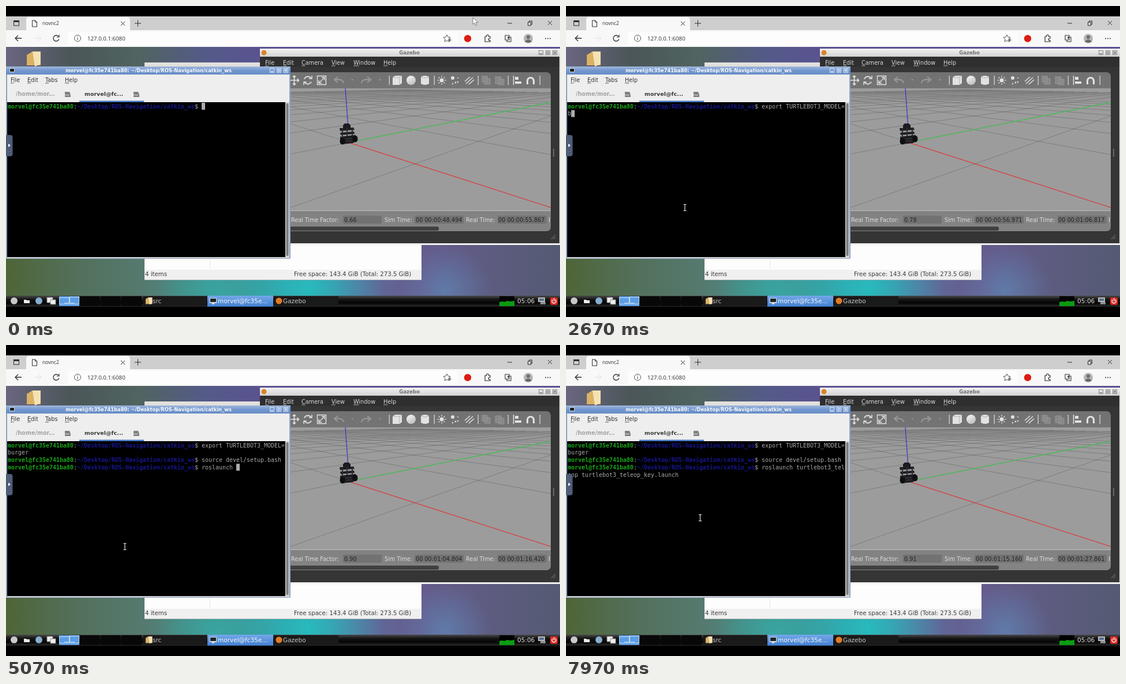
Animation, 960 px wide and 540 px high, one loop 8000 ms. Source, as an HTML page with a canvas:

```html
<!DOCTYPE html>
<html lang="en">
<head>
<meta charset="utf-8">
<title>Robot teleop session</title>
<style>
  html, body { margin: 0; width: 100%; height: 100%; overflow: hidden; background: #000; }
  canvas { position: absolute; left: 0; top: 0; }
</style>
</head>
<body>
<canvas id="desk" width="960" height="540"></canvas>
<canvas id="live" width="960" height="540"></canvas>
<script>
const LOOP = 8000;
const USER = 'morvel', HOST = 'fc35e741ba80';
const PATH = '~/Desktop/ROS-Navigation/catkin_ws';
const SANS = '"DejaVu Sans", sans-serif', MONO = '"DejaVu Sans Mono", monospace', WEB = '"Open Sans", sans-serif';
const desk = document.getElementById('desk').getContext('2d');
const live = document.getElementById('live').getContext('2d');
let c = desk;

// Drawing helpers
function rect(x, y, w, h, fill) { c.fillStyle = fill; c.fillRect(x, y, w, h); }
function box(x, y, w, h, stroke, width = 1) { c.strokeStyle = stroke; c.lineWidth = width; c.strokeRect(x, y, w, h); }
function round(x, y, w, h, r, fill) { c.fillStyle = fill; c.beginPath(); c.roundRect(x, y, w, h, r); c.fill(); }
function disc(x, y, r, fill) { c.fillStyle = fill; c.beginPath(); c.arc(x, y, r, 0, 7); c.fill(); }
function oval(x, y, rx, ry, fill) { c.fillStyle = fill; c.beginPath(); c.ellipse(x, y, rx, ry, 0, 0, 7); c.fill(); }
function arc(x, y, r, from, to, stroke, width = 1) {
  c.strokeStyle = stroke; c.lineWidth = width; c.beginPath(); c.arc(x, y, r, from, to); c.stroke();
}
function path(d, stroke, width = 1, fill) {
  const p = new Path2D(d);
  if (fill) { c.fillStyle = fill; c.fill(p); }
  if (stroke) { c.strokeStyle = stroke; c.lineWidth = width; c.stroke(p); }
}
function text(s, x, y, fill, font, align = 'left') {
  c.fillStyle = fill; c.font = font; c.textAlign = align; c.textBaseline = 'alphabetic';
  c.fillText(s, x, y);
}
function gradient(x0, y0, x1, y1, ...colors) {
  const g = c.createLinearGradient(x0, y0, x1, y1);
  colors.forEach((color, i) => g.addColorStop(i / (colors.length - 1), color));
  return g;
}
function glow(x, y, r, color) {
  const g = c.createRadialGradient(x, y, 0, x, y, r);
  g.addColorStop(0, color + 'd0'); g.addColorStop(1, color + '00');
  rect(0, 71, 960, 432, g);
}
function menu(items, y, fill) {
  for (const [label, x] of items) {
    text(label, x, y, fill, '9.7px ' + SANS);
    rect(x, y + 1.5, c.measureText(label[0]).width, 0.8, fill);
  }
}
function windowButtons(xs, y, color) {
  for (const x of xs) box(x - 3.5, y - 3.5, 7, 7, color, 0.8);
  rect(xs[0] - 2, y + 1, 4, 1.3, color);
  box(xs[1] - 1.5, y - 1.5, 3, 3, color);
  path(`M${xs[2] - 2} ${y - 2}l4 4m0-4l-4 4`, color, 1.2);
}

function drawBrowser() {
  const ink = '#2c2c2c', soft = '#555';
  rect(0, 18, 960, 24, '#cecece');
  round(35, 19, 180, 26, [5, 5, 0, 0], '#f8f8f8');
  rect(0, 42, 960, 29, '#f8f8f8');
  round(107, 45, 675, 23, 5, '#fdfdfd');
  box(13.5, 26, 9, 8, ink); rect(13, 25, 10, 3, ink);
  path('M45.5 25h5l3 3v8h-8zM50.5 25v3h3', ink);
  text('novnc2', 63, 33, ink, '8.6px ' + WEB);
  path('M199 27l7 7m0-7l-7 7M223 30h11M228.5 24.5v11', ink);
  path('M869 30h8M904.5 28h5v6h-5zM906.5 28v-2h5v6h-2M939 26l7 7m0-7l-7 7', ink);
  path('M27 56H16m5-5l-5 5 5 5', ink, 1.3);
  path('M50 56h11m-5-5l5 5-5 5', '#dedede');
  arc(87, 56, 5, 0.3, 5.6, ink, 1.3); path('M92 50v4h-4', ink, 1.2);
  arc(124, 56, 5.5, 0, 7, soft); rect(123.5, 55, 1.1, 4, soft); rect(123.5, 52.5, 1.1, 1.3, soft);
  text('127.0.0.1:6080', 141, 59.5, ink, '9.7px ' + WEB);
  path('M764 50l2 4 4 .5-3 3 1 4.5-4-2-4 2 1-4.5-3-3 4-.5z', soft);
  path('M766 59h6m-3-3v6', soft, 1.2);
  disc(800, 56.5, 6.2, '#dc1c10');
  path('M830 53h2.5q0-3 2-3t2 3h2.5v3q-3 0-3 2t3 2v2h-9z', ink, 1.2);
  path('M865 51h7v8h-7zM868 59v3h7v-8h-3M868.5 55h4m-2-2v4', ink, 1.1);
  disc(905, 56.5, 8, '#b4b4b4'); disc(905, 54, 3, '#6c6c6c'); path('M899 62q6-8 12 0q-6 4-12 0', null, 1, '#6c6c6c');
  for (const x of [935, 939, 943]) disc(x, 56.5, 1, ink);
}

function folder(x, y, s) {
  path(`M${x} ${y + 3 * s}l${5 * s} ${-3 * s}h${7 * s}v${12 * s}h${-12 * s}z`, null, 1, '#d9b266');
  path(`M${x + 5 * s} ${y}h${7 * s}v${11 * s}l${-5 * s} ${2 * s}z`, null, 1, '#f4e2b4');
}

function drawWallpaper() {
  rect(0, 71, 960, 432, gradient(0, 0, 960, 0, '#4f6538', '#52705a', '#557a70', '#41948f', '#3c92a0', '#5c6f9e', '#665a8c', '#5d5c80', '#545a72'));
  glow(525, 492, 130, '#1fc8c4');
  glow(370, 500, 110, '#37a8a4');
  glow(760, 495, 80, '#5f82b0');
  rect(0, 71, 960, 34, gradient(0, 0, 460, 0, '#6a6680', '#4b5658', '#506460', '#545a88', '#5b5192'));
}

function drawFileManager() {
  rect(240, 98, 480, 378, '#fdfdfd');
  rect(240, 98, 480, 8, '#e2e0dc');
  rect(353, 430, 1, 28, '#e8e8e8');
  rect(240, 458, 480, 17, '#f0f0f0');
  rect(240, 475, 480, 1, '#bdbdbd');
  text('4 items', 241, 469, '#3c3c3c', '10.2px ' + SANS);
  text('Free space: 143.4 GiB (Total: 273.5 GiB)', 499, 469, '#3c3c3c', '10.2px ' + SANS);
}

// Ground plane seen from a low camera; gx and gy are metres along the red and green axes
const cam = { x: 719, y: 249, f: 390, h: 0.6, right: -0.779, fwd: 2.357, pitch: 0.28, yaw: 0.75 };
function toCamera(gx, gy) {
  const s = Math.sin(cam.yaw), k = Math.cos(cam.yaw), sp = Math.sin(cam.pitch), cp = Math.cos(cam.pitch);
  const fwd = cam.fwd - gx * s + gy * k;
  return [cam.right + gx * k + gy * s, cam.h * cp - fwd * sp, fwd * cp + cam.h * sp];
}
function groundLine(x0, y0, x1, y1, color, width) {
  let a = toCamera(x0, y0), b = toCamera(x1, y1);
  const near = 0.1;
  if (a[2] < near && b[2] < near) return;
  const cut = (p, q) => p.map((v, i) => v + (q[i] - v) * (near - p[2]) / (q[2] - p[2]));
  if (a[2] < near) a = cut(a, b);
  else if (b[2] < near) b = cut(b, a);
  c.strokeStyle = color; c.lineWidth = width; c.beginPath();
  for (const p of [a, b]) c.lineTo(cam.x + cam.f * p[0] / p[2], cam.y + cam.f * p[1] / p[2]);
  c.stroke();
}

function drawRobot() {
  path('M584 207l3-3h7l3 3v5h-13zM578 212l24-1 2 4-25 2zM579 220l24-2 1 4-24 2zM579 227l26-3 4 3v6l-8 5-18 2-4-4z', null, 1, '#1c1c20');
  path('M583 213v15M600 212v14M591 211v15', '#2c2c32', 2);
  oval(583, 235, 4.5, 5.5, '#101012');
  oval(605, 231, 4.5, 5.5, '#101012');
  path('M588 231l11-1M589 235l10-1', '#45454c');
}

function drawToolbarIcons() {
  const light = '#e2e2e2', dim = '#979797', shade = '#a8a8a8';
  path('M492 129h15m-7.5-7.5v15m-2.5-13l2.5-2.5 2.5 2.5m-5 11l2.5 2.5 2.5-2.5m2.5-8.5l3 3-3 3', light, 1.7);
  arc(523, 129, 6.5, 0.4, 2.8, light, 1.8); arc(523, 129, 6.5, 3.5, 5.9, light, 1.8);
  path('M530 121v5h-5M516 137v-5h5', light, 1.5);
  path('M539.5 121.5h15v15h-15zM542 134l10-10m-5 0h5v5m-10 0v5h5', light, 1.4);
  path('M585 134q-1-8-15-6m5-5l-6 5 6 5', dim, 2.2);
  path('M616 134q1-8 15-6m-5-5l6 5-6 5', dim, 2.2);
  for (const x of [600, 648]) path(`M${x - 2} 127h4l-2 3z`, null, 1, dim);
  for (const x of [664, 742, 818, 870, 925]) rect(x - 0.5, 121, 1.5, 16, '#c8c8c8');
  path('M670 124l4-3h12v13l-4 3h-12z', null, 1, light); path('M670 124h12v13m0-13l4-3', shade, 0.8);
  disc(702, 129, 8, gradient(696, 122, 706, 137, '#f4f4f4', '#bcbcbc'));
  path('M719 123q7-4 14 0v12q-7 4-14 0z', null, 1, light); path('M719 123q7 4 14 0', shade, 0.9);
  disc(755, 129, 3.5, light);
  for (let i = 0; i < 8; i++) {
    const u = Math.cos(i * Math.PI / 4), v = Math.sin(i * Math.PI / 4);
    path(`M${755 + 5 * u} ${129 + 5 * v}l${2.5 * u} ${2.5 * v}`, light, 1.3);
  }
  disc(774, 125, 3, light); disc(783, 125, 1, light); disc(783, 132, 1.2, light); disc(774, 135, 1.2, light); disc(779, 133, 1.4, light);
  path('M795 131l9-8m-7 12l12-11m-7 12l9-8', light, 1.5);
  path('M825 122h9v10h-9zM829 126h10v10h-10z', dim, 1, '#878787');
  path('M848 123h10v12h-10zM854 127h9v10h-9z', dim, 1, '#878787');
  path('M879.5 121v16', light, 1.5); rect(882, 123, 6, 5, light); rect(882, 131, 11, 4, light);
  path('M903.5 136v-6a5.5 5.5 0 0 1 11 0v6', light, 3.2);
}

function drawGazebo() {
  rect(440, 74, 520, 341, '#ececec');
  rect(440, 74, 520, 14, gradient(0, 74, 0, 88, '#f2f2f2', '#d2d2d2'));
  disc(447, 81, 4.5, '#d7862a');
  text('Gazebo', 699, 84, '#707070', 'bold 8.6px ' + SANS, 'center');
  windowButtons([927, 939, 951], 81, '#707070');
  rect(440, 88, 519, 324, '#353535');
  rect(440, 88, 519, 18, '#2f2f2f');
  menu([['File', 449], ['Edit', 480], ['Camera', 512], ['View', 564], ['Window', 602], ['Help', 654]], 102, '#d8d8d8');
  round(470, 115, 474, 276, 7, gradient(0, 115, 0, 391, '#727272', '#848484'));
  c.save();
  c.beginPath(); c.rect(480, 143, 464, 212); c.clip();
  rect(480, 143, 464, 212, '#9c9c9c');
  for (let i = -20; i <= 20; i++) {
    const color = `rgba(85,85,85,${Math.abs(i) > 8 ? 0.2 : 0.5})`;
    groundLine(i, -20, i, 20, color, 0.85);
    groundLine(-20, i, 20, i, color, 0.85);
  }
  groundLine(0, 0, 0, 20, '#3cc84a', 1.2);
  groundLine(0, 0, 4, 0, '#e04040', 1.3);
  path('M588 143L592.5 206', '#3a3acc', 1.3);
  drawRobot();
  c.restore();
  rect(480, 355, 464, 1, '#bcbcbc');
  drawToolbarIcons();
  const label = '#dedede', font = '9.6px ' + SANS;
  text('Real Time Factor:', 494, 375, label, font);
  text('Sim Time:', 656, 375, label, font);
  text('Real Time:', 797, 375, label, font);
  rect(941, 367, 1, 8, label);
  for (const [x, w] of [[584, 67], [708, 85], [852, 85]]) round(x, 364, w, 14, 2, '#727272');
  round(480, 383, 270, 7, 3, '#404040');
  rect(948, 248, 2, 14, '#686868');
  path('M944 405l8-8m-5 8l5-5m-2 5l2-2', '#747474');
  rect(440, 412, 520, 2, '#f2f2f2');
}

function drawTerminalFrame() {
  rect(0, 105, 493, 334, '#eeeeee');
  rect(0, 105, 493, 14, gradient(0, 105, 0, 119, '#a0b8dc', '#7297cf', '#668cc6'));
  rect(6, 108, 9, 7, '#d9d9d9'); rect(7, 109, 7, 5, '#1b1f22');
  text(`${USER}@${HOST}: ${PATH}`, 247, 115, '#fafafa', 'bold 8.33px ' + SANS, 'center');
  windowButtons([461, 473, 485], 112, '#eef2f8');
  menu([['File', 8], ['Edit', 37], ['Tabs', 68], ['Help', 102]], 132, '#343434');
  text(`/home/${USER.slice(0, 3)}...`, 17, 156, '#a4a4a4', 'bold 9.6px ' + SANS);
  text(`${USER}@${HOST.slice(0, 2)}...`, 136, 156, '#3a3a3a', 'bold 9.5px ' + SANS);
  for (const x of [106, 225]) {
    path(`M${x - 4} 149h8l2 5v4h-10v-4z`, null, 1, '#808080');
    rect(x - 4, 154, 8, 1, '#e0e0e0');
  }
  rect(127, 164.5, 112, 2.5, '#4a7cc8');
  rect(2, 167, 482, 269, '#000');
  rect(484, 167, 7, 269, '#cecece');
  round(485.5, 169, 4, 265, 2, '#7c7c7c');
  rect(491, 119, 2, 320, '#8ea4c4');
  rect(0, 119, 2, 320, '#8ea4c4');
  rect(0, 437, 493, 2, '#a8b4c4');
}

function drawTaskbar() {
  rect(0, 503, 960, 19, gradient(0, 503, 0, 522, '#4a4a4a', '#161616', '#050505', '#2c2c2c'));
  disc(14, 512, 6, '#c8c8c8');
  path('M31 510h4l1 1h5v5h-10z', null, 1, '#ececec');
  disc(57, 512, 6, '#86aed0');
  path('M71 506h10v9h-10z', '#888', 1, '#eee'); path('M77 510h9v8h-9z', '#888', 1, '#eee');
  for (let i = 0; i < 4; i++) rect(92 + i * 36, 504, 35, 17, i ? '#080808' : '#5c9ee4');
  box(92.5, 506.5, 18, 11, '#c0dcf4'); box(109.5, 505.5, 17, 12, '#c0dcf4'); rect(101, 515, 18, 3, '#a0c8ee');
  rect(238, 504, 110, 17, '#1a1a1a');
  folder(242, 506, 0.95);
  text('src', 254, 515.5, '#c6c6c6', '10.5px ' + SANS);
  rect(349, 503, 114, 19, gradient(0, 503, 0, 522, '#74a8e8', '#4280d2'));
  rect(353, 507, 12, 9, '#dadada'); rect(354, 508, 10, 6, '#1d2528'); rect(357, 516, 4, 2, '#dadada');
  text(`${USER}@${HOST.slice(0, 5)}...`, 367, 515.5, '#f4f4f4', '10.5px ' + SANS);
  rect(464, 504, 112, 17, '#1a1a1a');
  disc(473, 512, 5.5, '#e07a24');
  text('Gazebo', 480, 515.5, '#c6c6c6', '10.5px ' + SANS);
  rect(855, 504, 26, 17, '#000');
  path('M855 521v-7l4-1 5 1 4-2 6 1 7-1v9z', null, 1, '#0c9c10');
  text('05:06', 886, 515.5, '#e2e2e2', '10.5px ' + SANS);
  rect(922, 506, 12, 8, '#b8b8b8'); rect(924, 508, 8, 4, '#536e8a'); rect(926, 514, 9, 4, '#8c8c8c');
  round(943, 506, 13, 13, 3, '#dc2a24');
  arc(949.5, 512.5, 3.5, -0.9, 4.05, '#fff', 1.3); rect(949, 507.5, 1.3, 5, '#fff');
}

// Piecewise linear value over [time, value] points
function track(points, t) {
  if (t <= points[0][0]) return points[0][1];
  for (let i = 1; i < points.length; i++) {
    const [t0, v0] = points[i - 1], [t1, v1] = points[i];
    if (t < t1) return v0 + (v1 - v0) * (t - t0) / (t1 - t0);
  }
  return points[points.length - 1][1];
}

// Each command: when its prompt appears, when Enter is pressed, and how many characters are typed when
const commands = [
  { row: 0, at: 0, enter: 3230, line: 'export TURTLEBOT3_MODEL=burger', keys: [[800, 0], [1700, 15], [3100, 30]] },
  { row: 2, at: 3260, enter: 4330, line: 'source devel/setup.bash', keys: [[3470, 0], [4230, 23]] },
  { row: 3, at: 4430, enter: LOOP, line: 'roslaunch turtlebot3_teleop turtlebot3_teleop_key.launch',
    keys: [[4500, 0], [5030, 10], [5200, 10], [6580, 28], [6700, 28], [7570, 36], [7600, 38], [7760, 56]] }
];
const COLS = 80, CELL = 6, LINE = 12.75;
const cellX = n => 3 + (n % COLS) * CELL;
const rowY = row => 177.5 + row * LINE;

function drawShell(t) {
  const font = '9.97px ' + MONO, plain = '#a9a9a9';
  const promptLength = USER.length + HOST.length + PATH.length + 4;
  let cursor;
  for (const cmd of commands) {
    if (t < cmd.at) break;
    const y = rowY(cmd.row), typed = cmd.line.slice(0, Math.floor(track(cmd.keys, t) + 1e-6));
    text(`${USER}@${HOST}`, 3, y, '#18a818', 'bold ' + font);
    text(':', cellX(19), y, plain, font);
    text(PATH, cellX(20), y, '#16168e', 'bold ' + font);
    text('$', cellX(54), y, plain, font);
    const room = COLS - promptLength;
    text(typed.slice(0, room), cellX(promptLength), y, plain, font);
    text(typed.slice(room), 3, y + LINE, plain, font);
    const end = promptLength + typed.length;
    cursor = [cellX(end), cmd.row + Math.floor(end / COLS)];
    if (t >= cmd.enter) cursor = [3, cmd.row + Math.floor((promptLength + cmd.line.length - 1) / COLS) + 1];
  }
  if (t < 7850) rect(cursor[0], rowY(cursor[1]) - 9.5, CELL, 12, '#acacac');
}

const marks = [0, 1730, 3430, 4370, 5070, 6630, 7970];
const timeline = values => marks.map((t, i) => [t, values[i]]);
const simTime = timeline([48.491, 53.495, 59.775, 62.098, 64.8, 70.264, 75.16]);
const realTime = timeline([55.863, 63.14, 69.783, 73.403, 76.416, 82.436, 87.861]);
const factor = timeline([0.66, 0.76, 0.8, 0.93, 0.9, 0.9, 0.91]);
function clock(s) {
  return `00 00:0${Math.floor(s / 60)}:${(s % 60).toFixed(3).padStart(6, '0')}`;
}
function drawCounters(t) {
  const font = '9.7px ' + SANS, ink = '#222';
  text(track(factor, t).toFixed(2), 586, 375, ink, font);
  text(clock(track(simTime, t)), 710, 375, ink, font);
  text(clock(track(realTime, t)), 853, 375, ink, font);
}

function drawPointer(t) {
  const ease = track([[80, 0], [650, 1]], t), s = ease * ease * (3 - 2 * ease);
  const back = track([[7680, 0], [7950, 1]], t);
  const x = 809 - 603 * s + 26.5 * back, y = 20 + 330 * s - 50 * back;
  if (x < 484 && y > 167) {
    const beam = `M${x - 2.5} ${y - 5.5}h5M${x} ${y - 5.5}v11M${x - 2.5} ${y + 5.5}h5`;
    path(beam, '#000', 3); path(beam, '#e6e6e6', 1.2);
  } else {
    path(`M${x} ${y}v12l3-2.5 2 4.5 2-1-2-4.5h4z`, '#707070', 0.9, '#fff');
  }
}

function drawHandle() {
  round(-4, 224, 15.5, 37, 4, '#4c5a74');
  for (let y = 228; y < 259; y += 4) for (const x of [3, 7]) if (Math.abs(y - 242) > 5) rect(x, y, 1, 1, '#8894ac');
  path('M4 239l4 3-4 3z', null, 1, '#fff');
}

function frame(now) {
  const t = now % LOOP;
  live.clearRect(0, 0, 960, 540);
  drawShell(t);
  drawCounters(t);
  drawHandle();
  drawPointer(t);
  requestAnimationFrame(frame);
}

rect(0, 0, 960, 540, '#000');
drawBrowser();
drawWallpaper();
folder(36, 79, 2);
drawFileManager();
drawGazebo();
drawTerminalFrame();
drawTaskbar();
c = live;
requestAnimationFrame(frame);
</script>
</body>
</html>
```
